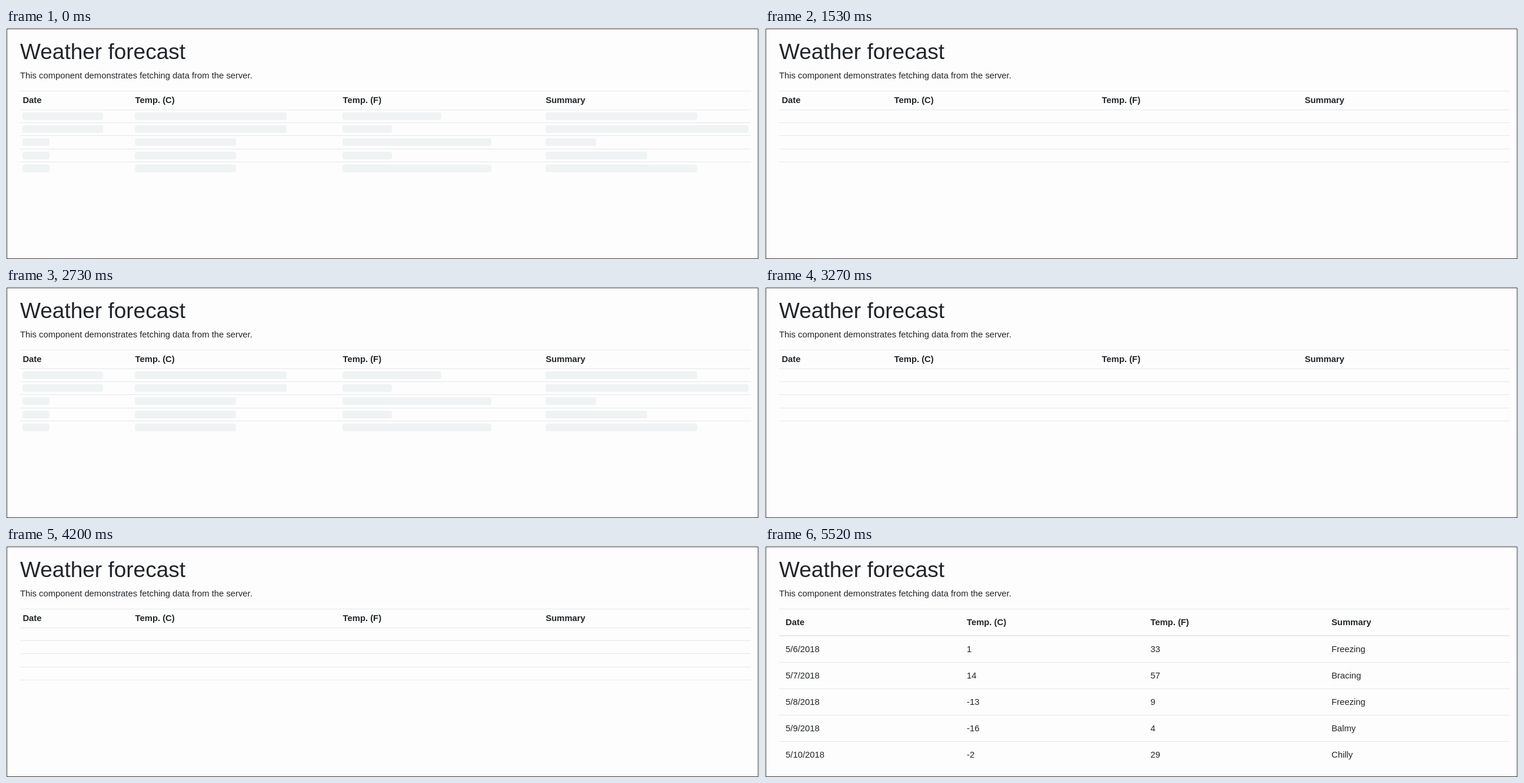
Recreate the animation shown at these times as an HTML page. Size 1280 px wide and 394 px high, loop 6090 ms.

```html
<!DOCTYPE html>
<html lang="en">
<head>
<meta charset="utf-8">
<title>Weather forecast</title>
<style>
  html, body { margin: 0; width: 100%; height: 100%; overflow: hidden; background: #fdfdfd; }
  svg { display: block; width: 1280px; height: 394px; }
  text { font: 14.8px "Liberation Sans", Arial, sans-serif; fill: #212529; }
  .title { font-size: 37px; }
  .head { font-weight: bold; }
  .rule { fill: #e5e7e9; }
  .bar { fill: #eff3f3; }
</style>
</head>
<body>
<svg id="stage" viewBox="0 0 1280 394">
  <rect x="1.5" y="1.5" width="1277" height="392" fill="#fdfdfd" stroke="#38383a"/>
  <text class="title" x="24" y="53">Weather forecast</text>
  <text x="24" y="86">This component demonstrates fetching data from the server.</text>
  <rect class="rule" x="24" y="107" width="1242" height="1"/>
  <g id="loading"><g id="bars"></g></g>
  <g id="loaded"></g>
</svg>
<script>
const LOOP = 6090;
const LOADED_AT = 5520;
// Spans in which the placeholder bars are faded out.
const HIDDEN = [[690, 960], [1530, 1830], [2340, 2730], [3270, 3660], [4200, 4650]];

const HEADINGS = ["Date", "Temp. (C)", "Temp. (F)", "Summary"];
const FORECASTS = [
  ["5/6/2018", "1", "33", "Freezing"],
  ["5/7/2018", "14", "57", "Bracing"],
  ["5/8/2018", "-13", "9", "Freezing"],
  ["5/9/2018", "-16", "4", "Balmy"],
  ["5/10/2018", "-2", "29", "Chilly"]
];
const BAR_WIDTHS = [
  [137, 258, 168, 258],
  [137, 258, 84, 345],
  [46, 172, 253, 86],
  [46, 172, 84, 173],
  [46, 172, 253, 258]
];
const LOADING_X = [28.4, 219.6, 572.6, 917.4];
const LOADED_X = [35.1, 343, 655.3, 963];
const BAR_X = [28, 219, 572, 917];

const byId = id => document.getElementById(id);

function add(parent, tag, attributes, content = "") {
  const node = document.createElementNS("http://www.w3.org/2000/svg", tag);
  for (const [name, value] of Object.entries(attributes)) node.setAttribute(name, value);
  node.textContent = content;
  parent.append(node);
}

function addTextRow(parent, labels, columns, y, className = "") {
  labels.forEach((label, i) => add(parent, "text", { x: columns[i], y, class: className }, label));
}

function addRule(parent, y, height = 1) {
  add(parent, "rect", { x: 24, y, width: 1242, height, class: "rule" });
}

const loading = byId("loading"), loaded = byId("loaded"), bars = byId("bars");

addTextRow(loading, HEADINGS, LOADING_X, 128, "head");
BAR_WIDTHS.forEach((widths, row) => {
  const offset = Math.round(row * 22.2);
  addRule(loading, 139 + offset);
  widths.forEach((width, i) =>
    add(bars, "rect", { x: BAR_X[i], y: 144 + offset, width, height: 13, rx: 4, class: "bar" }));
});

addTextRow(loaded, HEADINGS, LOADED_X, 135, "head");
addRule(loaded, 152, 2);
FORECASTS.forEach((cells, row) => {
  if (row) addRule(loaded, 153 + row * 45);
  addTextRow(loaded, cells, LOADED_X, 181 + row * 45);
});

const show = (node, visible) => { node.style.display = visible ? "" : "none"; };

function draw(now) {
  const time = now % LOOP;
  show(loading, time < LOADED_AT);
  show(loaded, time >= LOADED_AT);
  show(bars, !HIDDEN.some(([from, to]) => time >= from && time < to));
}

const start = performance.now();
function tick() {
  draw(performance.now() - start);
  requestAnimationFrame(tick);
}
tick();
</script>
</body>
</html>
```
